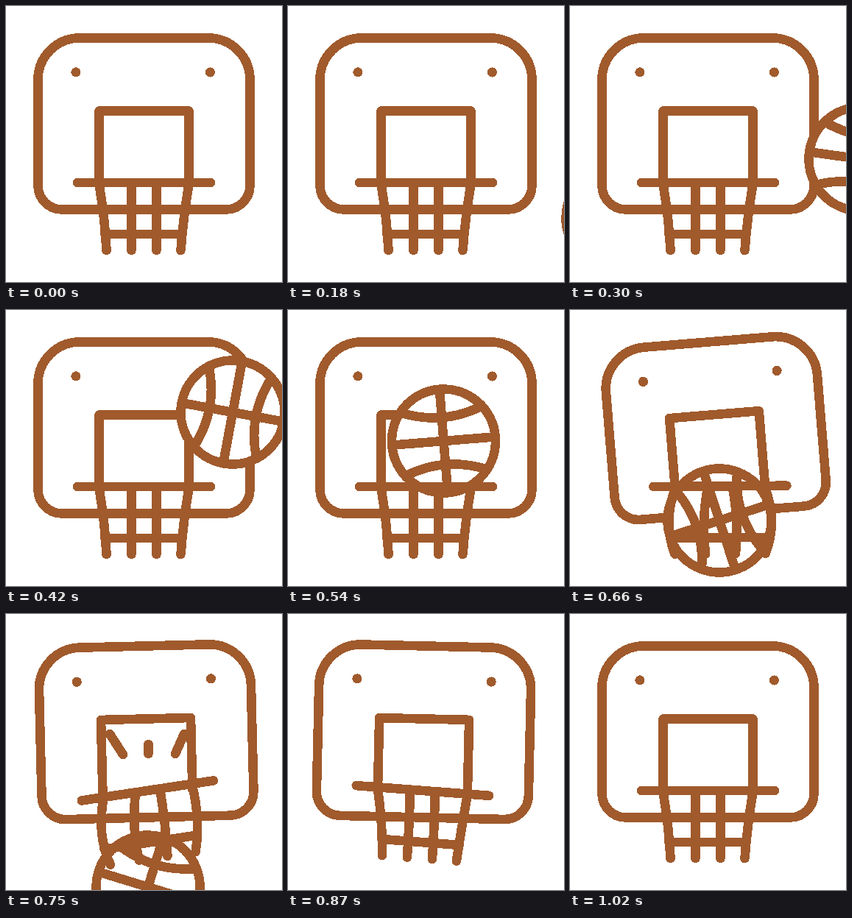
An HTML page for the animation above (1500 ms loop, 375 by 375 pixels).

```html
<!DOCTYPE html>
<html lang="en">
<head>
<meta charset="utf-8">
<title>Basketball hoop</title>
<style>
  html, body { margin: 0; width: 100%; height: 100%; overflow: hidden; background: #fff; }
  svg { display: block; width: 100vw; height: 100vh; }
  .line { fill: none; stroke: #a05a2c; stroke-width: 12.6; stroke-linecap: round; stroke-linejoin: round; }
  .dot { fill: #a05a2c; stroke: none; }
</style>
</head>
<body>
<svg viewBox="0 0 375 375" shape-rendering="crispEdges">
  <g class="line">
    <g id="board">
      <path d="M100 43.5H275A56.5 56.5 0 0 1 331.5 100V244A32.5 32.5 0 0 1 299 276.5H76A32.5 32.5 0 0 1 43.5 244V100A56.5 56.5 0 0 1 100 43.5Z"/>
      <path d="M126.5 240V142.5H248.5V240"/>
      <circle class="dot" cx="95" cy="90" r="6.6"/>
      <circle class="dot" cx="277.3" cy="90" r="6.6"/>
    </g>
    <path id="marks"/>
    <g id="ball">
      <circle r="70.5" fill="#fff"/>
      <path d="M-70 0H70M0 -70V70M-43 -55Q-21 0 -43 55M43 -55Q21 0 43 55"/>
    </g>
    <g id="rim">
      <path d="M-90.5 0H90.5"/>
      <path id="net"/>
    </g>
  </g>
</svg>
<script>
const LOOP = 1500, STEP = 30;
const PIVOT = { x: 187.5, y: 40 }, RIM_DROP = 200;
const part = id => document.getElementById(id);
const [board, marks, ball, rim, net] = ["board", "marks", "ball", "rim", "net"].map(part);

// Each key is [time, value]; the curve through them is smooth.
const ballX = [[60, 500], [150, 461], [180, 448], [300, 395], [420, 308], [540, 211.5], [660, 203], [750, 193], [840, 185], [930, 180]];
const ballY = [[60, 370], [180, 288], [300, 208], [420, 139], [540, 178], [660, 286], [750, 371], [840, 456], [930, 541]];
const ballSpin = [[60, 235], [180, 175], [300, 98], [420, 10.5], [540, -94.6], [660, -198], [750, -253], [840, -300]];
const boardTilt = [[570, 0], [660, -4.7], [690, -4.9], [750, -1.4], [820, 2.6], [920, -0.8], [1020, 0]];
const rimTilt = [[570, 0], [660, 4.3], [750, -7.2], [840, 4], [930, -1.8], [1020, 0]];
const netBulge = [[540, 0], [660, 11], [750, 8], [840, 1], [930, 0]];
const netSway = [[660, 0], [750, -6], [840, 4], [930, -2], [1020, 0]];

function slope(keys, i) {
  if (i === 0 || i === keys.length - 1) return 0;
  const [[t0, v0], [t1, v1], [t2, v2]] = keys.slice(i - 1, i + 2);
  const before = t1 - t0, after = t2 - t1;
  return ((v1 - v0) / before * after + (v2 - v1) / after * before) / (before + after);
}

function at(keys, t) {
  const next = keys.findIndex(key => key[0] > t);
  if (next === 0) return keys[0][1];
  if (next < 0) return keys[keys.length - 1][1];
  const [t0, v0] = keys[next - 1], [t1, v1] = keys[next];
  const span = t1 - t0, u = (t - t0) / span;
  const ease = u * u * (3 - 2 * u);
  return v0 + (v1 - v0) * ease
    + span * u * (1 - u) * ((1 - u) * slope(keys, next - 1) - u * slope(keys, next));
}

const clamp = u => Math.max(0, Math.min(1, u));

function netPath(bulge, sway) {
  const strand = (top, middle, bottom) => `M${top} 2Q${middle + sway} 50 ${bottom + sway} 92`;
  const side = 53 + 1.4 * bulge;
  return strand(-61, -53 - 2.3 * bulge, -51 - bulge)
    + strand(-17, -17 - 0.8 * bulge, -17 - 0.3 * bulge)
    + strand(17, 17 + 0.8 * bulge, 17 + 0.3 * bulge)
    + strand(61, 53 + 2.3 * bulge, 50 + bulge)
    + `M${sway - side} 70H${side + sway - 1}`;
}

function marksPath(t) {
  const head = clamp((t - 690) / 60), tail = clamp((t - 750) / 90);
  if (head <= 0 || tail >= 1) return "";
  const ray = (x, y, dx, dy) =>
    `M${x + dx * tail} ${y + dy * tail}L${x + dx * head} ${y + dy * head}`;
  return ray(159, 191, -18, -28) + ray(193.5, 190, 0, -13) + ray(230, 190, 12, -27);
}

function draw(t) {
  const tilt = at(boardTilt, t), swing = tilt * Math.PI / 180;
  board.setAttribute("transform", `rotate(${tilt} ${PIVOT.x} ${PIVOT.y})`);

  const rimX = PIVOT.x - RIM_DROP * Math.sin(swing);
  const rimY = PIVOT.y + RIM_DROP * Math.cos(swing);
  rim.setAttribute("transform", `translate(${rimX} ${rimY}) rotate(${tilt + at(rimTilt, t)})`);
  net.setAttribute("d", netPath(at(netBulge, t), at(netSway, t)));

  ball.setAttribute("transform",
    `translate(${at(ballX, t)} ${at(ballY, t)}) rotate(${at(ballSpin, t)})`);
  marks.setAttribute("d", marksPath(t));
}

const start = performance.now();
function tick() {
  const t = (performance.now() - start) % LOOP;
  draw(Math.floor(t / STEP) * STEP);
  requestAnimationFrame(tick);
}
tick();
</script>
</body>
</html>
```
